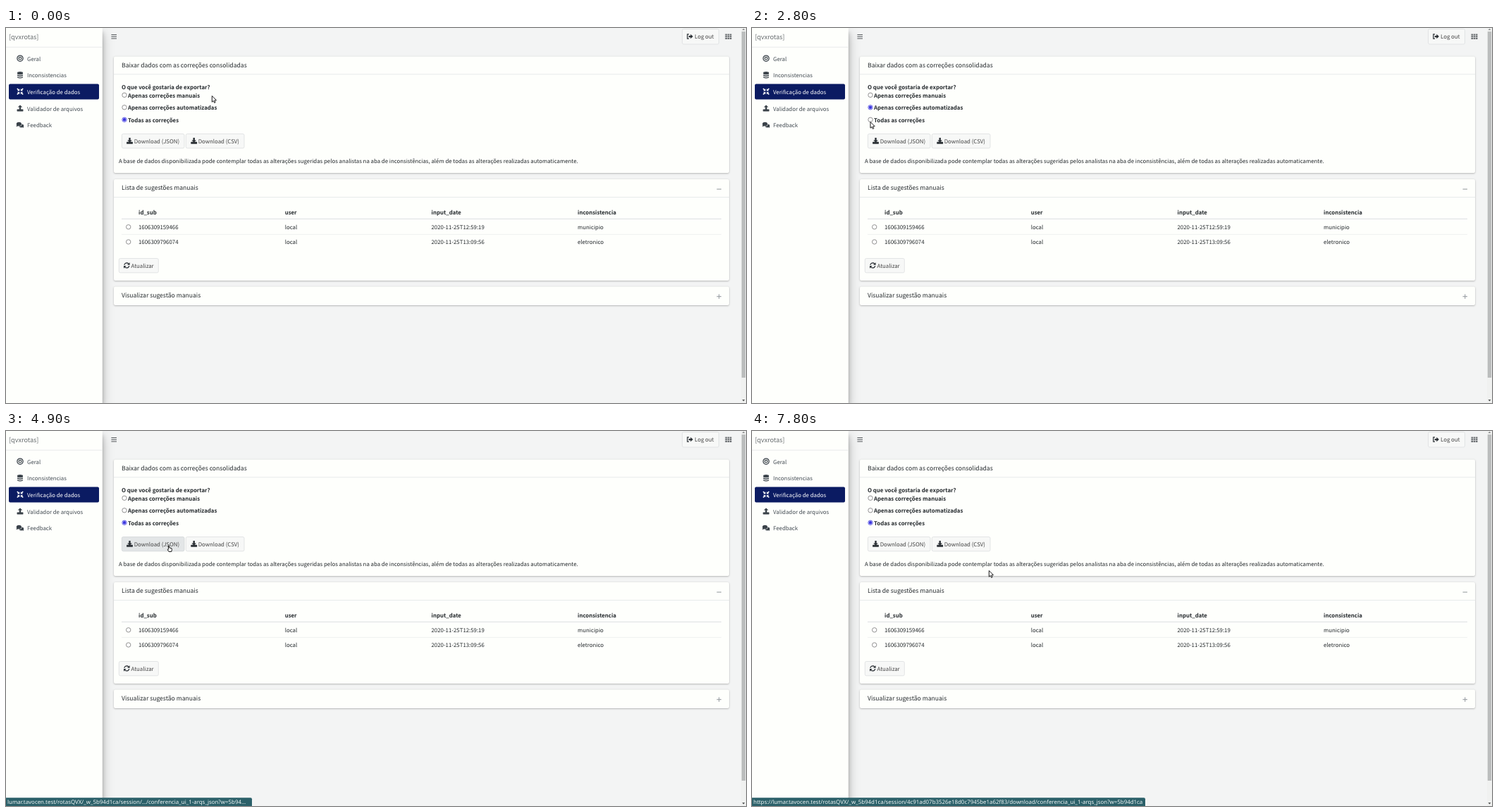
An HTML page with a canvas that plays this animation: 1050 px wide and 533 px high, repeating every 8000 ms.

```html
<!DOCTYPE html>
<html lang="pt-BR">
<head>
<meta charset="utf-8">
<title>Verificação de dados</title>
<style>
html, body { margin: 0; width: 100%; height: 100%; overflow: hidden; background: #f3f4f4; }
canvas { display: block; width: 1050px; height: 533px; }
</style>
</head>
<body>
<canvas id="stage"></canvas>
<script>
const W = 1050, H = 533, LOOP = 8000;
const SANS = '"Noto Sans CJK JP", "Noto Sans CJK SC", "Noto Sans", sans-serif';
const BODY = 7.83, TITLE = 8.6;
const PAPER = '#fefffc', INK = '#23282c', MENU = '#434b53', ICON = '#3a4249', LINE = '#dfe2e4';

const canvas = document.getElementById('stage');
const ctx = canvas.getContext('2d');
const dpr = window.devicePixelRatio || 1;
canvas.width = W * dpr;
canvas.height = H * dpr;
ctx.scale(dpr, dpr);
ctx.textRendering = 'geometricPrecision';

function text(s, x, y, { size = BODY, weight = 400, color = INK, family = SANS } = {}) {
  ctx.font = `${weight} ${size}px ${family}`;
  ctx.fillStyle = color;
  ctx.fillText(s, x, y);
}

function rect(x, y, w, h, color) {
  ctx.fillStyle = color;
  ctx.fillRect(x, y, w, h);
}

function box(x, y, w, h, r, fill, stroke) {
  ctx.beginPath();
  ctx.roundRect(x, y, w, h, r);
  ctx.fillStyle = fill;
  ctx.fill();
  if (stroke) {
    ctx.strokeStyle = stroke;
    ctx.lineWidth = 0.8;
    ctx.stroke();
  }
}

function poly(points, color) {
  ctx.beginPath();
  points.forEach(([x, y]) => ctx.lineTo(x, y));
  ctx.closePath();
  ctx.fillStyle = color;
  ctx.fill();
}

function disc(x, y, rx, ry, color) {
  ctx.beginPath();
  ctx.ellipse(x, y, rx, ry, 0, 0, Math.PI * 2);
  ctx.fillStyle = color;
  ctx.fill();
}

function ring(x, y, r, width, color) {
  ctx.beginPath();
  ctx.arc(x, y, r, 0, Math.PI * 2);
  ctx.strokeStyle = color;
  ctx.lineWidth = width;
  ctx.stroke();
}

function shadowed(color, blur, dy, draw) {
  ctx.save();
  ctx.shadowColor = color;
  ctx.shadowBlur = blur * dpr;
  ctx.shadowOffsetY = dy * dpr;
  draw();
  ctx.restore();
}

// Icons are drawn around their own centre.
const icons = {
  target(c) {
    ring(0, 0, 4.1, 1.3, c);
    ring(0, 0, 1.8, 1.2, c);
  },
  database(c) {
    disc(0, -3.1, 4, 1.5, c);
    for (const y of [-2.1, 0.5, 3.1]) {
      ctx.beginPath();
      ctx.moveTo(-4, y - 0.6);
      ctx.quadraticCurveTo(0, y + 1.4, 4, y - 0.6);
      ctx.lineTo(4, y + 0.8);
      ctx.quadraticCurveTo(0, y + 2.6, -4, y + 0.8);
      ctx.fillStyle = c;
      ctx.fill();
    }
  },
  compress(c) {
    for (let i = 0; i < 4; i++) {
      ctx.rotate(Math.PI / 2);
      poly([[0.8, 0.8], [4, 0.8], [3, 1.8], [4.7, 3.7], [3.7, 4.7], [1.8, 3], [0.8, 4]], c);
    }
  },
  tray(c, up) {
    ctx.beginPath();
    ctx.roundRect(-4.4, 1.4, 8.8, 3, 0.7);
    ctx.fillStyle = c;
    ctx.fill();
    const s = up ? -1 : 1, y = up ? -1.6 : -1;
    poly([[-1.2, y - 3.4 * s], [1.2, y - 3.4 * s], [1.2, y], [3.3, y],
      [0, y + 3.2 * s], [-3.3, y], [-1.2, y]], c);
  },
  comments(c) {
    disc(1.9, 1.2, 3.3, 2.5, c);
    poly([[2.5, 2.5], [4.8, 2.2], [5.2, 4.4]], c);
    disc(-1.6, -1.1, 4.1, 3.3, PAPER);
    disc(-1.6, -1.1, 3.6, 2.8, c);
    poly([[-5, 0], [-2.5, 1], [-5.2, 2.7]], c);
  },
  sync(c) {
    ctx.lineWidth = 1.3;
    ctx.strokeStyle = c;
    for (let i = 0; i < 2; i++) {
      ctx.rotate(Math.PI);
      ctx.beginPath();
      ctx.arc(0, 0, 3.5, Math.PI * 1.06, Math.PI * 1.78);
      ctx.stroke();
      poly([[4.3, -4.3], [4.3, -0.6], [0.7, -0.6]], c);
    }
  },
  exit(c) {
    poly([[-1.8, -1.1], [0.8, -1.1], [0.8, -3.2], [4.4, 0], [0.8, 3.2], [0.8, 1.1], [-1.8, 1.1]], c);
    ctx.beginPath();
    ctx.moveTo(-1.5, -3.1);
    ctx.lineTo(-3.7, -3.1);
    ctx.lineTo(-3.7, 3.1);
    ctx.lineTo(-1.5, 3.1);
    ctx.strokeStyle = c;
    ctx.lineWidth = 1.2;
    ctx.stroke();
  }
};

function icon(name, x, y, color = ICON, option) {
  ctx.save();
  ctx.translate(x, y);
  icons[name](color, option);
  ctx.restore();
}

function radio(x, y, checked, pressed) {
  disc(x, y, 3.3, 3.3, pressed ? '#e6e6e6' : '#ffffff');
  ring(x, y, 3.2, 0.8, checked ? '#3a35df' : pressed ? '#9a9a9a' : '#777777');
  if (checked) disc(x, y, 2.2, 2.2, '#3a35df');
}

function button(x, y, w, h, label, labelX, name, iconX, hover) {
  box(x, y, w, h, 2, hover ? '#e3e6e7' : '#f7f8f7', hover ? '#d2d6d8' : '#dcdfe0');
  icon(name, iconX, y + h / 2 - 0.2, '#2c3136');
  text(label, labelX, y + h / 2 + 2.9, { color: '#444444' });
}

function card(y, h, title, hasBody) {
  shadowed('rgba(0,0,0,.3)', 2.4, 0.7, () => box(153, y, 873, h, 2, PAPER));
  if (hasBody) rect(153, y + 25, 873, 0.7, LINE);
  text(title, 164, y + 15.3, { size: TITLE });
}

function sidebar() {
  ctx.save();
  ctx.beginPath();
  ctx.rect(136.5, 0, 60, H);
  ctx.clip();
  for (const [color, blur, dy] of [['rgba(0,0,0,.25)', 15.3, 7.6], ['rgba(0,0,0,.22)', 5.5, 5.5]]) {
    shadowed(color, blur, dy, () => rect(0, 0, 136.5, H, PAPER));
  }
  ctx.restore();
  rect(0, 0, 136.5, H, PAPER);
  rect(0, 26.8, 136.5, 0.7, LINE);
  text('[qvxrotas]', 4, 16, { size: 9.1, weight: 300, color: '#666b6e' });

  box(4, 79.5, 128, 22, 2, '#0b1b62');
  const items = [
    ['Geral', 43.5, 'target'],
    ['Inconsistencias', 67, 'database'],
    ['Verificação de dados', 90.5, 'compress'],
    ['Validador de arquivos', 114.5, 'tray'],
    ['Feedback', 138, 'comments']
  ];
  items.forEach(([label, y, name], i) => {
    const active = i === 2;
    icon(name, 20, y - 0.3, active ? '#ffffff' : ICON, true);
    text(label, 30, y + 3, { color: active ? '#ffffff' : MENU });
  });
}

function topbar() {
  for (const y of [9, 11.7, 14.4]) rect(149.4, y, 7.6, 1.1, '#5f6366');
  button(959.5, 1.5, 52, 21.5, 'Log out', 977, 'exit', 970.5);
  for (let i = 0; i < 9; i++) {
    rect(1020.5 + (i % 3) * 3.2, 8.5 + Math.floor(i / 3) * 2.7, 2.6, 2.1, '#6b6f72');
  }
}

function scrollbar() {
  rect(1043, 0, 7, H, '#f0f1f0');
  box(1043.8, 5, 5.4, 492, 0.5, '#bbbdbd');
  poly([[1044.5, 3], [1048.5, 3], [1046.5, 0.8]], '#8b8d8d');
  poly([[1044.5, 528.2], [1048.5, 528.2], [1046.5, 530.5]], '#404242');
}

function exportCard(t) {
  card(40.5, 165.5, 'Baixar dados com as correções consolidadas', true);
  text('O que você gostaria de exportar?', 164, 86.6, { weight: 700 });
  const chosen = t >= 1500 && t < 2500 ? 0 : t >= 2500 && t < 3300 ? 1 : 2;
  const pressed = [1400, 2400, 3200].findIndex(p => t >= p && t < p + 100);
  ['Apenas correções manuais', 'Apenas correções automatizadas', 'Todas as correções'].forEach((label, i) => {
    const y = 95.3 + i * 17.5;
    radio(168, y, chosen === i, pressed === i);
    text(label, 173, y + 3.2, { weight: 700 });
  });
  button(164.4, 150.5, 88.6, 20.3, 'Download (JSON)', 181.7, 'tray', 175.5, t >= 4700 && t < 7600);
  button(255.3, 150.5, 82.7, 20.3, 'Download (CSV)', 272.7, 'tray', 266.7);
  text('A base de dados disponibilizada pode contemplar todas as alterações sugeridas pelos analistas na aba de ' +
    'inconsistências, além de todas as alterações realizadas automaticamente.', 160, 191.5);
}

function listCard() {
  card(215, 144, 'Lista de sugestões manuais', true);
  rect(1008.5, 228.5, 6.5, 1.1, '#9a9fa3');
  const columns = [188, 395.7, 603.5, 811];
  const row = (cells, y, weight) => cells.forEach((s, i) => text(s, columns[i], y, { weight }));
  row(['id_sub', 'user', 'input_date', 'inconsistencia'], 264.8, 700);
  rect(164, 270.8, 851, 1.1, LINE);
  row(['1606309159466', 'local', '2020-11-25T12:59:19', 'municipio'], 285.6, 400);
  rect(164, 292.9, 851, 0.6, '#e6e8e9');
  row(['1606309796074', 'local', '2020-11-25T13:09:56', 'eletronico'], 306.9, 400);
  radio(173.7, 282.8);
  radio(173.7, 304);
  button(160.3, 327.5, 56, 20.3, 'Atualizar', 177.5, 'sync', 171.3);
}

function viewCard() {
  card(367.5, 26.5, 'Visualizar sugestão manuais', false);
  rect(1008.5, 381.1, 6.5, 1.1, '#9a9fa3');
  rect(1011.2, 378.4, 1.1, 6.5, '#9a9fa3');
}

const shortLink = 'lumar.tavocen.test/rotasQVX/_w_5b94d1ca/session/…/conferencia_ui_1-arqs_json?w=5b94…';
const fullLink = 'https://lumar.tavocen.test/rotasQVX/_w_5b94d1ca/session/' +
  '4c91ad07b3526e18d0c7945be1a62f83/download/conferencia_ui_1-arqs_json?w=5b94d1ca';

function statusBar(t) {
  if (t < 4900) return;
  const w = t < 6200 ? 349 : t < 6300 ? 470 : 558;
  ctx.save();
  ctx.beginPath();
  ctx.roundRect(0, 521.3, w, 12, [0, 2, 0, 0]);
  ctx.fillStyle = '#2b6069';
  ctx.fill();
  ctx.clip();
  text(t < 6200 ? shortLink : fullLink, 2, 530,
    { size: 7.9, weight: 500, color: '#f2f7f7', family: '"Noto Sans", sans-serif' });
  ctx.restore();
}

// Pointer path: time, x, y.
const path = [
  [300, 292, 96], [600, 235, 91], [800, 190, 89.5], [1000, 168, 94],
  [1700, 168, 94], [1900, 168, 112], [2500, 168, 112], [2800, 167.7, 133],
  [4100, 167.7, 133], [4200, 152, 158], [4400, 125.5, 199], [4500, 150, 197],
  [4700, 230, 162.3], [7500, 230, 162.3], [7800, 336, 198]
];

function pointerAt(t) {
  const i = path.findIndex(p => p[0] >= t);
  if (i < 0) return path[path.length - 1].slice(1);
  if (i === 0) return path[0].slice(1);
  const [t0, x0, y0] = path[i - 1], [t1, x1, y1] = path[i];
  const k = (t - t0) / (t1 - t0);
  return [x0 + (x1 - x0) * k, y0 + (y1 - y0) * k];
}

function pointer(t) {
  const [x, y] = pointerAt(t);
  const hand = t >= 4900 && t < 7600;
  ctx.save();
  ctx.translate(x, y);
  const shape = hand
    ? [[0.4, 0.8], [1.6, 0.8], [1.8, 3.7], [5, 4.4], [5.4, 6], [4.8, 9.2], [1, 9.2], [-0.8, 6.2], [0.4, 6]]
    : [[0.3, 0.5], [0.3, 9.2], [2.3, 7.5], [3.7, 10.4], [5.1, 9.7], [3.8, 6.9], [6.5, 6.7]];
  poly(shape, '#ffffff');
  ctx.strokeStyle = '#1c1c1c';
  ctx.lineWidth = 1;
  ctx.lineJoin = 'round';
  ctx.stroke();
  ctx.restore();
}

function draw(now) {
  const t = Math.floor((now % LOOP) / 100) * 100;
  rect(0, 0, W, H, '#f3f4f4');
  topbar();
  exportCard(t);
  listCard();
  viewCard();
  sidebar();
  scrollbar();
  statusBar(t);
  pointer(t);
}

const start = performance.now();
function tick() {
  draw(performance.now() - start);
  requestAnimationFrame(tick);
}
tick();
</script>
</body>
</html>
```
